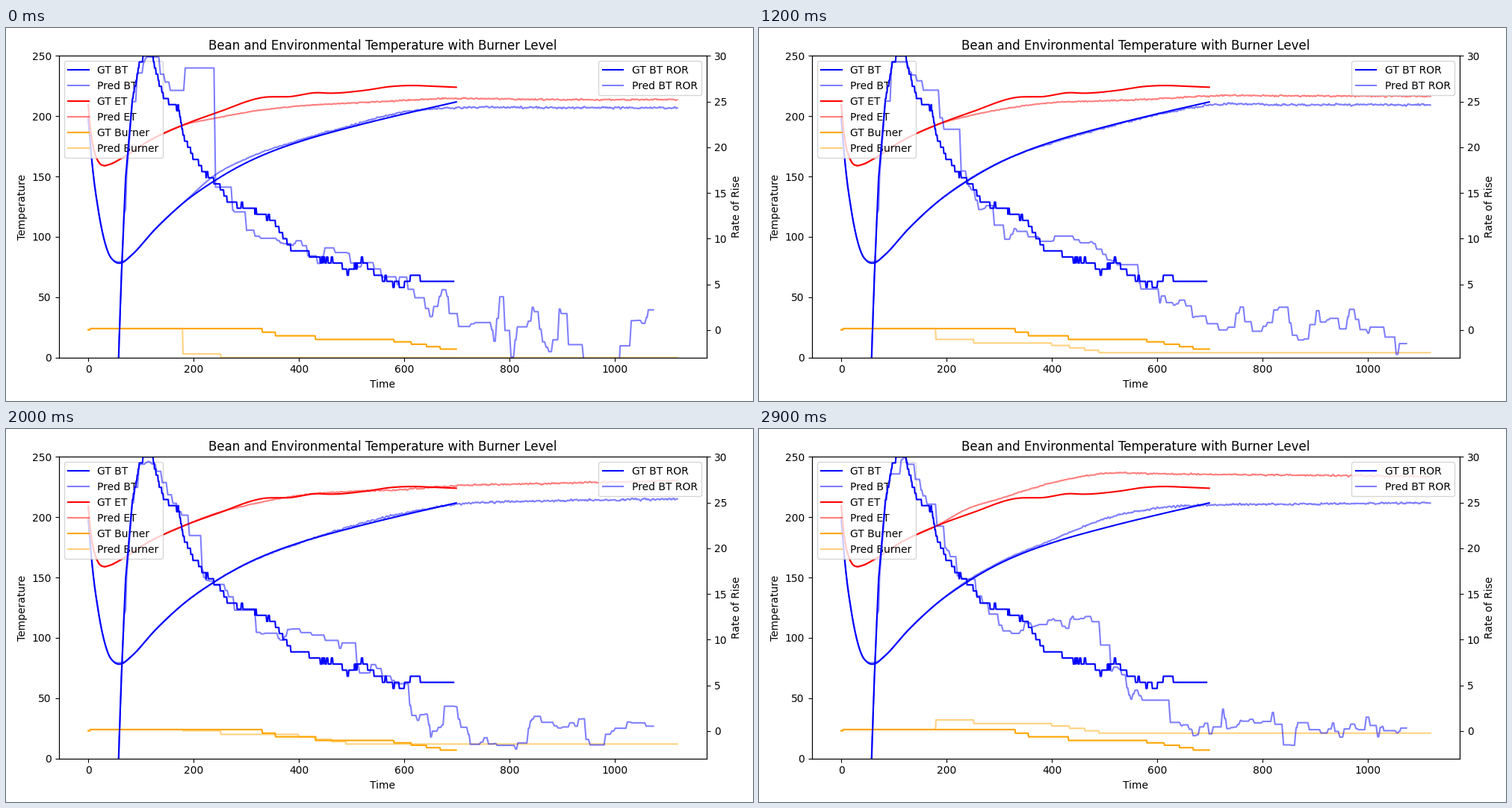
A matplotlib script for the animation above (3000 ms loop, 1000 px wide and 500 px high).

```python
import numpy as np
import matplotlib.pyplot as plt
from matplotlib.animation import FuncAnimation

FRAMES, INTERVAL = 30, 100
GT_TIME, PRED_TIME = np.arange(700), np.arange(1120)
SPLIT = 180  # the prediction starts here
ROR_STEP = 2 / 3

# Key points: (seconds, value)
GT_BT = [(0, 198), (6, 167), (11, 146.5), (17, 128), (24, 110), (31, 96.4), (39, 85.9),
         (48, 80.3), (56, 78.3), (64, 78.6), (82, 84.7), (127, 106.3), (180, 127.9),
         (240, 146.5), (300, 161.4), (350, 171), (400, 178.7), (500, 191.1),
         (600, 201.9), (699, 211.8)]
GT_ET = [(0, 209.5), (4, 190), (9, 175.6), (15, 166.3), (21, 161.2), (29, 159.1),
         (39, 159.8), (63, 165), (113, 179), (180, 192.6), (248, 203.5), (333, 215.6),
         (383, 216.2), (436, 219.5), (454, 219.1), (525, 221.4), (575, 224.6),
         (622, 225.4), (645, 225), (699, 224)]
GT_ROR = [(57, -4), (63, 6), (70, 15.5), (77, 21), (86, 26), (98, 29.3), (110, 30.4),
          (122, 30), (130, 28), (145, 25.3), (172, 24.3), (180, 21.5), (200, 19),
          (225, 17), (255, 15.3), (265, 14.1), (310, 13.3), (350, 12.2), (370, 10.3),
          (385, 8.9), (410, 8.7), (440, 7.7), (470, 7.5), (495, 6.3), (520, 7.7),
          (545, 6.1), (575, 5.3), (600, 4.8), (615, 6), (640, 5.4), (695, 5.3)]
GT_BURNER = [(0, 23), (4, 24), (331, 21), (356, 18), (432, 15), (581, 13), (614, 11),
             (643, 9), (669, 7)]
BURNER_CUTS = [(SPLIT, 3), (252, 0), (400, -2), (434, -4), (463, -6), (490, -8)]

# Forecast temperatures for a few burner settings, blended in between.
SETTINGS = [0, 12, 16, 29]
KNOTS = [240, 300, 400, 500, 600, 700, 850, 1119]
PRED_BT = np.array([[151, 164.8, 180, 192.3, 203.5, 207, 207, 206.9],
                    [147, 161.6, 177.8, 190.3, 201.2, 209, 209.4, 209.6],
                    [146, 160.6, 177.2, 190, 201.5, 211, 214.3, 216.5],
                    [147.5, 162.5, 181, 198.5, 207.5, 210, 210.7, 211.8]])
PRED_ET = np.array([[198.2, 203.2, 208.4, 210.9, 213.1, 214.7, 213.8, 213.7],
                    [200, 205.3, 211.2, 212.7, 214.4, 216.8, 216.8, 216.5],
                    [201, 207.2, 213.4, 214.9, 217.1, 222, 224.5, 228.8],
                    [207, 215.2, 228.4, 236.2, 235.9, 235.4, 234.9, 233.8]])

ROR_RISE = [(57, -4), (62, 4.5), (66, 9.5), (68, 12.7), (71, 13.2), (73, 17), (84, 25)]
ROR_HEAD = [(84, 25), (96, 29.3), (120, 29.6), (135, 28), (160, 25.5), (175, 23.8),
            (200, 20), (220, 17.3), (250, 15.4), (290, 12.2)]
ROR_LOW = [(320, 10.5), (400, 9), (450, 8.7), (580, 6.6), (605, 4), (675, 2.2), (700, 0.2), (1074, 0.2)]
ROR_HIGH = [(350, 11.4), (430, 11.9), (485, 11.3), (505, 7.3), (550, 4), (620, 1), (700, 0.4), (1074, 0.2)]


def smooth(points, x):
    """Cubic Hermite curve through the points."""
    px, py = np.array(points, float).T
    slope = np.gradient(py, px)
    i = np.clip(np.searchsorted(px, x, "right") - 1, 0, len(px) - 2)
    h = px[i + 1] - px[i]
    u = (x - px[i]) / h
    return ((1 + 2 * u) * (1 - u) ** 2 * py[i] + u * (1 - u) ** 2 * h * slope[i]
            + u * u * (3 - 2 * u) * py[i + 1] + u * u * (u - 1) * h * slope[i + 1])


def hold(steps, end, ramp=1):
    """Plateaus starting at each step, joined by short ramps."""
    path = [steps[0]]
    for (x0, y0), (x1, y1) in zip(steps, steps[1:]):
        path += [(x1 - min(ramp, 0.6 * (x1 - x0)), y0), (x1, y1)]
    return np.array(path + [(end, steps[-1][1])], float)


def trend(points, x):
    return np.interp(x, *np.array(points).T)


def gt_ror():
    """Quantised rate of rise that flickers where it lies between two levels."""
    t = np.arange(57, 695)
    flicker = np.repeat(np.random.default_rng(5).normal(0, 0.1, len(t)), 3)[:len(t)]
    return t, ROR_STEP * np.round((trend(GT_ROR, t) + flicker) / ROR_STEP)


def pred_ror(n):
    rng = np.random.default_rng(n)
    x = 84 + np.cumsum(3 + rng.exponential(9, 160))
    x = np.r_[84, x[x < 1068]]
    heat = (n / 29) ** 2
    y = (1 - heat) * trend(ROR_HEAD + ROR_LOW, x) + heat * trend(ROR_HEAD + ROR_HIGH, x)
    y += 6.5 * max(0, 1 - n / 14) * np.exp(-((x - 188) / 15) ** 2)
    spread = np.interp(x, [100, 300, 600, 720], [0.2, 0.5, 0.8, 1.6 - 0.5 * heat])
    y += spread * np.convolve(rng.standard_normal(len(x)), [0.5, 0.8, 0.3], "same")
    return np.vstack([ROR_RISE, hold(list(zip(x, y)), 1073.5, 3)])


def pred_temperature(gt, table, n, rng, jitter):
    row = [np.interp(n, SETTINGS, column) for column in table.T]
    y = smooth([p for p in gt if p[0] <= SPLIT] + list(zip(KNOTS, row)), PRED_TIME)
    ripple = np.convolve(rng.standard_normal(len(y)), np.ones(3) / 3 ** 0.5, "same")
    return y + jitter * np.interp(PRED_TIME, [SPLIT, 300, 600], [0, 0.4, 1]) * ripple


def pred_burner(n):
    cuts = [(t, max(n + change, 0)) for t, change in BURNER_CUTS]
    return hold(GT_BURNER[:2] + cuts, PRED_TIME[-1])


fig, ax = plt.subplots(figsize=(10, 5), dpi=100)
rate_ax = ax.twinx()

ax.plot(GT_TIME, smooth(GT_BT, GT_TIME), color="blue", label="GT BT")
bt_line, = ax.plot([], [], color="blue", alpha=0.5, label="Pred BT")
ax.plot(GT_TIME, smooth(GT_ET, GT_TIME), color="red", label="GT ET")
et_line, = ax.plot([], [], color="red", alpha=0.5, label="Pred ET")
ax.plot(*hold(GT_BURNER, GT_TIME[-1]).T, color="orange", label="GT Burner")
burner_line, = ax.plot([], [], color="orange", alpha=0.5, label="Pred Burner")
rate_ax.plot(*gt_ror(), color="blue", label="GT BT ROR")
ror_line, = rate_ax.plot([], [], color="blue", alpha=0.5, label="Pred BT ROR")

margin = 0.05 * PRED_TIME[-1]
ax.set(xlim=(-margin, PRED_TIME[-1] + margin), ylim=(0, 250), xlabel="Time",
       ylabel="Temperature", title="Bean and Environmental Temperature with Burner Level")
rate_ax.set(ylim=(-3, 30), ylabel="Rate of Rise")
ax.legend(loc="upper left")
rate_ax.legend(loc="upper right")
fig.tight_layout()


def update(n):
    rng = np.random.default_rng(100 + n)
    bt = pred_temperature(GT_BT, PRED_BT, n, rng, 0.4)
    bt += 1.2 * np.exp(-((PRED_TIME - 60) / 11) ** 2)
    bt_line.set_data(PRED_TIME, bt)
    et_line.set_data(PRED_TIME, pred_temperature(GT_ET, PRED_ET, n, rng, 0.3))
    burner_line.set_data(*pred_burner(n).T)
    ror_line.set_data(*pred_ror(n).T)
    return bt_line, et_line, burner_line, ror_line


anim = FuncAnimation(fig, update, frames=FRAMES, interval=INTERVAL, repeat=True)
plt.show()
```
